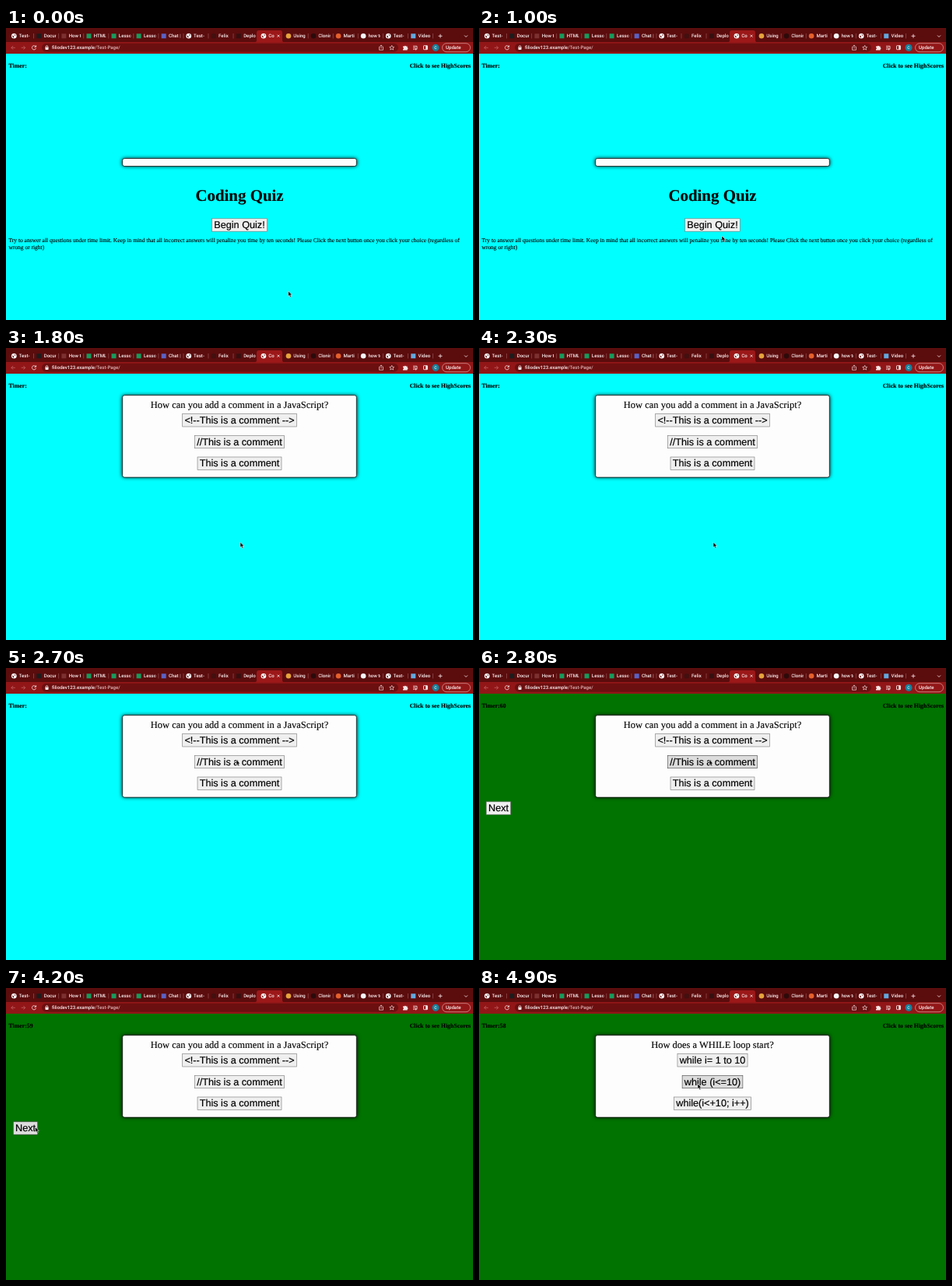
These frames come from a looping animation (600x375 px, 5 s). An HTML page:

```html
<!DOCTYPE html>
<html lang="en">
<head>
<meta charset="utf-8">
<title>Coding Quiz</title>
<style>
html, body { margin: 0; width: 100%; height: 100%; overflow: hidden; }
svg { display: block; }
text { white-space: pre; text-rendering: geometricPrecision; }
.ui { font: 500 6.1px Roboto, sans-serif; fill: #fbeeee; }
.serif { font: 7.47px "Liberation Serif", serif; stroke: #000; stroke-width: .12; }
.bold { font-weight: bold; font-size: 7.83px; }
.title { font-size: 20.9px; }
.question { font-size: 12.5px; }
.button text { font: 12.65px "Liberation Sans", sans-serif; stroke: #000; stroke-width: .18; }
.button rect { fill: #efefef; stroke: #767676; stroke-width: .6; }
.button.hover rect { fill: #dcdcdc; stroke: #444; }
.mid { text-anchor: middle; }
.line { fill: none; stroke: #f0dada; stroke-width: .9; }
.dim { stroke: #bd5c5c; }
</style>
</head>
<body>
<svg id="stage" width="600" height="375" viewBox="0 0 600 375">
  <rect id="page" width="600" height="375"/>
  <g class="serif bold">
    <text id="timer" x="3.5" y="51">Timer:</text>
    <text x="597" y="51" text-anchor="end">Click to see HighScores</text>
  </g>
  <rect class="card" x="149.200" width="301.600" rx="3" style="filter:blur(2.4px)"/>
  <rect class="card" x="149.700" width="300.600" rx="2.400" fill="#fdfdfd" stroke="#000" stroke-width=".7"/>

  <g id="intro" class="serif">
    <text class="bold title mid" x="300" y="222">Coding Quiz</text>
    <text x="3.500" y="275.200">Try to answer all questions under time limit. Keep in mind that all incorrect answers will penalize you time by ten seconds! Please Click the next button once you click your choice (regardless of</text>
    <text x="3.500" y="284">wrong or right)</text>
  </g>
  <g id="first"></g>
  <g id="second"></g>
  <g id="next"></g>

  <rect width="600" height="19" fill="#5b0c0d"/>
  <rect y="18" width="600" height="15" fill="#921617"/>
  <path d="M319 18.500q3 0 3-3V6q0-3 3-3h27q3 0 3 3v9.500q0 3 3 3z" fill="#9c1819"/>
  <rect x="46" y="19.700" width="458" height="11" rx="5.500" fill="#6c0f10"/>
  <g id="tabs" class="ui"></g>
  <g class="line">
    <path d="M348.500 8.700l3 3m0-3l-3 3M555.500 10.300h5m-2.500-2.500v5M589 9.500l2 2 2-2"/>
    <path class="dim" d="M11.800 25.300h-5m2.300-2.300l-2.300 2.300 2.300 2.300M19.700 25.300h5m-2.300-2.300l2.300 2.300-2.300 2.300"/>
    <path d="M38.300 24a2.600 2.600 0 1 0 .2 2M38.600 22.300v2.100h-2.100"/>
    <path d="M51.200 25v-1a1.300 1.300 0 0 1 2.600 0v1"/>
    <path d="M480.500 24.200h-1v4h5v-4h-1M482 26.500v-4.500m-1.500 1.400l1.500-1.500 1.500 1.500" stroke-width=".7"/>
    <path d="M495.700 22.300l.9 2 2.100.2-1.600 1.400.5 2.100-1.900-1.100-1.900 1.100.5-2.100-1.600-1.400 2.100-.2z" stroke-width=".7"/>
    <path d="M523 23.300h5m-5 2h3.500m-3.500 2h2M528 23.300v4"/>
    <rect x="536.500" y="22.700" width="5" height="5" rx=".5"/>
    <rect x="560.500" y="19.700" width="36" height="11" rx="5.500" stroke="#e0a4a4" stroke-width=".7"/>
  </g>
  <g fill="#f6e6e6">
    <rect x="50.500" y="24.800" width="4" height="3.200" rx=".4"/>
    <path d="M510 23.500h1.700a1.200 1.200 0 0 1 2.300 0h1.600v1.600a1.200 1.200 0 0 1 0 2.300v1.100h-5.600v-1.500a1 1 0 0 0 0-2z"/>
    <rect x="539.200" y="22.700" width="2.300" height="5"/>
    <circle cx="526.500" cy="27.300" r="1.100"/>
  </g>
  <circle cx="552" cy="25.200" r="4.500" fill="#14829c"/>
  <g class="ui">
    <text x="59" y="27.400">filiodev123.example<tspan fill="#dfb3b3">/Test-Page/</tspan></text>
    <text class="mid" x="552" y="27.200" style="font-size:5px">C</text>
    <text x="565" y="27.400">Update</text>
  </g>
  <path id="cursor" d="M0 0V6.600L1.500 5.200 2.600 7.700 3.800 7.200 2.800 4.800H4.800Z" stroke="#fff" stroke-width=".5"/>
</svg>
<script>
const $ = id => document.getElementById(id);
const cards = document.querySelectorAll('.card');

function add(parent, tag, attrs, text = '') {
  const el = document.createElementNS('http://www.w3.org/2000/svg', tag);
  for (const key in attrs) el.setAttribute(key, attrs[key]);
  el.textContent = text;
  return parent.appendChild(el);
}

function button(parent, label, x, y) {
  const group = add(parent, 'g', { class: 'button' });
  const box = add(group, 'rect', { y, height: 16.4 });
  const text = add(group, 'text', { x, y: y + 12.3, class: 'mid' }, label);
  const width = text.getComputedTextLength() + 5.4;
  box.setAttribute('x', x - width / 2);
  box.setAttribute('width', width);
  return group;
}

function question(parent, title, answers) {
  add(parent, 'text', { x: 300, y: 76.5, class: 'serif question mid' }, title);
  return answers.map((answer, i) => button(parent, answer, 300, 84.6 + i * 27.7));
}

// Browser tabs: label, icon colour, icon shape
const tabs = [
  ['Test-', '#fff', 'globe'], ['Docum', '#1c1c1c'], ['How to', '#7c3030'], ['HTML:', '#189a5c'],
  ['Lesso', '#189a5c'], ['Lesso', '#189a5c'], ['Chat |', '#5b62c4'], ['Test-', '#fff', 'globe'],
  ['Felix', '#42100f', 'disc'], ['Deplo', '#351010'], ['Co', '#fff', 'globe'], ['Using', '#e5a33c', 'disc'],
  ['Clonin', '#2b0b0b', 'disc'], ['Marti', '#e4602c', 'disc'], ['how to', '#f4f4f4', 'disc'],
  ['Test-', '#fff', 'globe'], ['Video', '#62a9e0']
];
const bar = $('tabs');
const separator = x => add(bar, 'path', { d: `M${x} 7v6.500`, stroke: '#a06060', 'stroke-width': .6 });

tabs.forEach(([label, fill, shape], i) => {
  const x = 10.3 + i * 32.06, y = 10.3;
  if (shape) add(bar, 'circle', { cx: x, cy: y, r: 3.3, fill });
  else add(bar, 'rect', { x: x - 3, y: y - 3, width: 6, height: 6, fill });
  if (shape === 'globe')
    add(bar, 'path', { d: `M${x - 2.5} ${y - .8}l2 .7 .3 1.8-.8 .7zM${x + .3} ${y - 2.4}l1.8 1-1 1.300z`, fill: '#5b0c0d' });
  // Long labels are cut off at the end of the tab.
  const clip = add(bar, 'svg', { x: x + 6.3, width: 15.6, height: 19 });
  add(clip, 'text', { y: 12.4 }, label);
  if (i && i !== 10 && i !== 11) separator(x - 6.8);
});
separator(548.5);

const begin = button($('intro'), 'Begin Quiz!', 300, 244.8);
const next = button($('next'), 'Next', 25, 171.8);
const firstAnswers = question($('first'), 'How can you add a comment in a JavaScript?',
  ['<!--This is a comment -->', '//This is a comment', 'This is a comment']);
const secondAnswers = question($('second'), 'How does a WHILE loop start?',
  ['while i= 1 to 10', 'while (i<=10)', 'while(i<+10; i++)']);

// Pointer stops: time, x, y
const stops = [
  [0, 362.7, 338], [400, 362.7, 338], [1000, 312, 267], [1500, 301, 249.5], [2400, 301, 249.5],
  [2700, 296, 118], [3000, 296, 118], [3900, 37.5, 178.5], [4400, 37.5, 178.5], [4900, 281, 123]
];

function pointer(t) {
  const i = stops.findIndex(stop => stop[0] > t);
  if (i < 0) return stops[stops.length - 1].slice(1);
  const [t0, x0, y0] = stops[i - 1], [t1, x1, y1] = stops[i];
  const p = (t - t0) / (t1 - t0), ease = p * p * (3 - 2 * p);
  return [x0 + (x1 - x0) * ease, y0 + (y1 - y0) * ease];
}

const show = (id, on) => $(id).style.display = on ? '' : 'none';
const hover = (el, on) => el.classList.toggle('hover', on);

function draw(t) {
  const within = (from, to) => t >= from && t < to;
  const started = t >= 1800, answered = t >= 2800;
  $('page').setAttribute('fill', answered ? '#007300' : '#0ff');
  $('timer').textContent = 'Timer:' + (answered ? 60 - Math.floor((t - 2800) / 1000) : '');
  for (const card of cards) {
    card.setAttribute('y', started ? 60.7 : 167.5);
    card.setAttribute('height', started ? 105.4 : 10);
  }
  show('intro', !started);
  show('first', within(1800, 4400));
  show('next', within(2800, 4400));
  show('second', t >= 4400);
  hover(begin, within(1300, 1800));
  hover(firstAnswers[1], within(2800, 3200));
  hover(next, within(3900, 4400));
  hover(secondAnswers[1], t >= 4900);
  $('cursor').setAttribute('transform', `translate(${pointer(t)})`);
}

function frame() {
  draw(Math.floor(performance.now() % 5000 / 100) * 100);
  requestAnimationFrame(frame);
}
frame();
</script>
</body>
</html>
```
